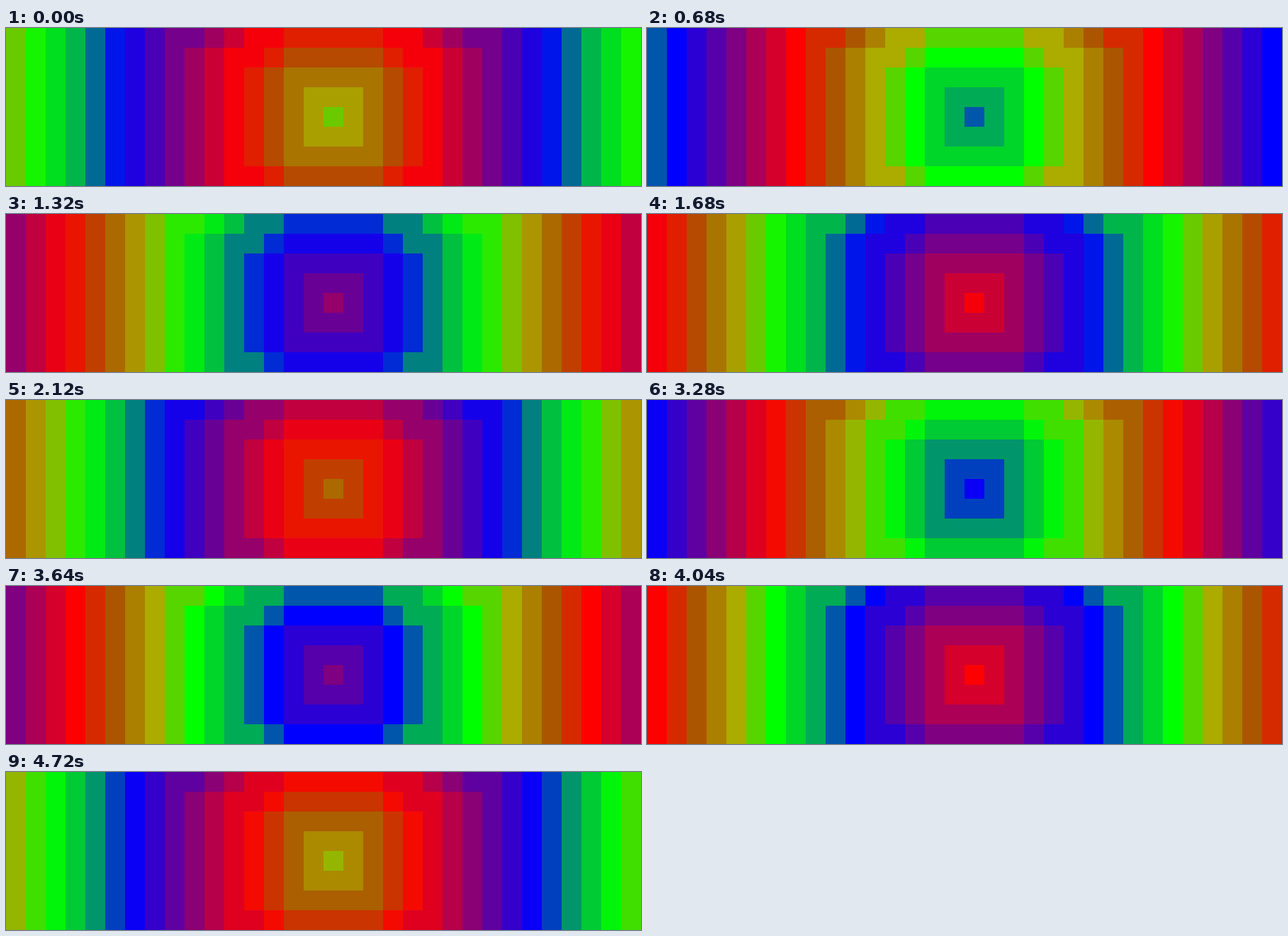
Write an HTML page with a canvas that moves like this. It is 1024 px wide and 256 px high and loops after 4760 ms.

```html
<!DOCTYPE html>
<html lang="en">
<head>
<meta charset="utf-8">
<title>Rainbow rings</title>
<style>
  html, body { margin: 0; width: 100%; height: 100%; overflow: hidden; background: #000; }
  canvas { display: block; width: 1024px; height: 256px; }
</style>
</head>
<body>
<canvas id="stage" width="1024" height="256"></canvas>
<script>
const ctx = document.getElementById('stage').getContext('2d');
const CELL = 32, COLS = 32, ROWS = 8, CX = 16, CY = 4;
const TICK = 40, LOOP = 4760, START_HUE = 76, HUE_STEP = 4;

const palette = ('FF0000 D52A00 AB5500 AB7F00 ABAB00 56D500 00FF00 00D52A ' +
  '00AB55 0056AA 0000FF 2A00D5 5500AB 7F0081 AB0055 D5002B')
  .split(' ')
  .map(hex => [0, 2, 4].map(i => parseInt(hex.slice(i, i + 2), 16)));

// Pace of the hue: [tick, steps taken so far]
const pace = [[0, 0], [17, 17], [33, 35], [53, 55], [82, 86], [101, 109], [118, 126], [119, 128]];

function stepsAt(tick) {
  const i = pace.findIndex(([end]) => end > tick);
  const [t0, s0] = pace[i - 1], [t1, s1] = pace[i];
  return Math.round(s0 + (s1 - s0) * (tick - t0) / (t1 - t0));
}

// 8-bit blend between neighbouring palette entries
function colorAt(hue) {
  const h = hue & 255, a = palette[h >> 4], b = palette[((h >> 4) + 1) & 15];
  const mix = (h & 15) << 4;
  if (!mix) return `rgb(${a})`;
  const rgb = a.map((v, i) => (v * (256 - mix) >> 8) + (b[i] * (mix + 1) >> 8));
  return `rgb(${rgb})`;
}

function draw(tick) {
  const hue = START_HUE + HUE_STEP * stepsAt(tick);
  for (let y = 0; y < ROWS; y++) {
    for (let x = 0; x < COLS; x++) {
      const ring = Math.floor(Math.hypot(x - CX, y - CY));
      ctx.fillStyle = colorAt(hue - 16 * ring);
      ctx.fillRect(x * CELL, y * CELL, CELL, CELL);
    }
  }
}

let shown = -1;
function loop() {
  const tick = Math.floor(performance.now() % LOOP / TICK);
  if (tick !== shown) draw(shown = tick);
  requestAnimationFrame(loop);
}
loop();
</script>
</body>
</html>
```
